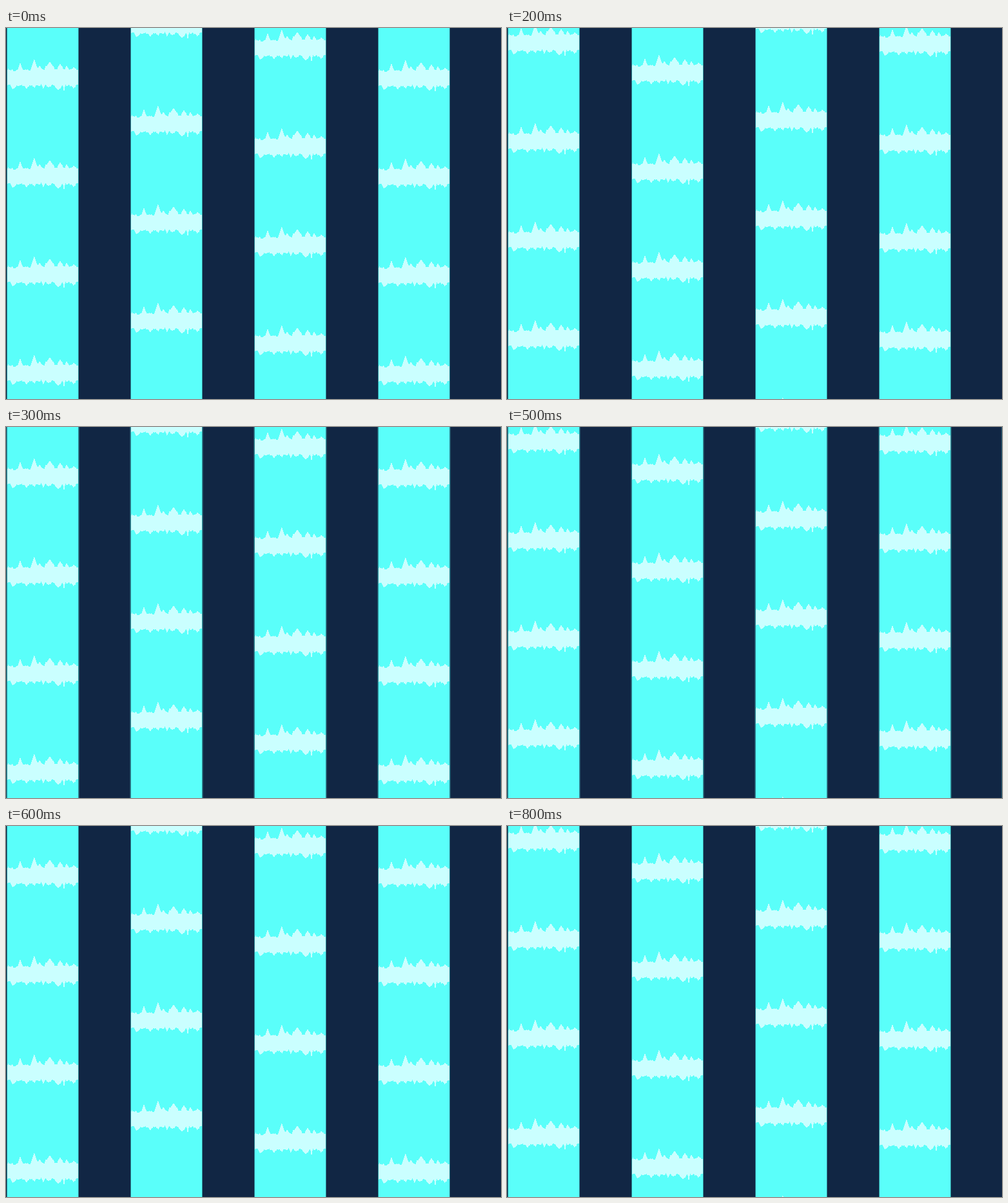
These frames come from a looping animation (768x576 px, 900 ms). An HTML page:

```html
<!DOCTYPE html>
<html lang="en">
<head>
<meta charset="utf-8">
<title>Flowing columns</title>
<style>
html, body { margin: 0; width: 100%; height: 100%; overflow: hidden; background: #112644; }
svg { display: block; width: 100vw; height: 100vh; }
</style>
</head>
<body>
<svg id="stage" viewBox="0 0 768 576" shape-rendering="crispEdges">
  <rect width="768" height="576" fill="#112644"/>
</svg>
<script>
const NS = 'http://www.w3.org/2000/svg';
const stage = document.getElementById('stage');
const STEP = 100, LOOP = 900, GAP = 153, WIDTH = 110, PITCH = 192;

// Main spikes of the wave: x, height, half width
const crests = [[20, 13, 4], [42, 18, 6], [50, 8, 4], [66, 14, 9], [82, 11, 5], [92, 8, 4], [104, 4, 6]];
const dips = [[10, 7, 6], [30, 6, 5], [42, 5, 3], [56, 7, 2], [65, 4, 5], [79, 9, 7], [88, 12, 2], [102, 5, 5]];

// Wave offset of each column at the first and last of three poses
const columns = [[48, 147], [-33, 41], [2, 114], [49, 149]];

function add(parent, tag, attrs) {
  const el = document.createElementNS(NS, tag);
  for (const key in attrs) el.setAttribute(key, attrs[key]);
  return parent.appendChild(el);
}

function seeded(seed) {
  return () => (seed = (seed * 16807) % 2147483647) / 2147483647;
}

const random = seeded(29);

function edge(level, spikes, dir) {
  const list = [];
  for (let x = 0; x <= WIDTH; x++) {
    const rise = Math.max(0, ...spikes.map(([at, h, w]) => h * (1 - Math.abs(x - at) / w)));
    const jitter = rise < 5 ? random() * 4 - 1 : 0;
    list.push(`${x},${(level + dir * (rise + jitter)).toFixed(1)}`);
  }
  return list;
}

const outline = [...edge(18, crests, -1), ...edge(40, dips, 1).reverse()].join(' ');
const glow = add(stage, 'g', { fill: '#24566c' });
add(glow, 'rect', { x: 767, width: 1, height: 576 });

const flows = columns.map((ends, i) => {
  const x = 2 + i * PITCH;
  add(glow, 'rect', { x: x - 2, width: WIDTH + 4, height: 576 });
  add(stage, 'rect', { x: x - 1, width: WIDTH + 2, height: 576, fill: '#2c8792' });
  add(stage, 'rect', { x, width: WIDTH, height: 576, fill: '#5afffa' });
  const g = add(stage, 'g', { fill: '#caffff' });
  for (let n = -1; n < 5; n++) {
    add(g, 'polygon', { points: outline, transform: `translate(0 ${n * GAP})` });
  }
  return { g, x, ends };
});

function draw(ms) {
  const t = ms % LOOP;
  const pose = Math.floor(t / STEP) % 3;
  for (const { g, x, ends: [from, to] } of flows) {
    const y = Math.round(from + (to - from) * pose / 2) % GAP;
    g.setAttribute('transform', `translate(${x} ${y})`);
  }
  glow.setAttribute('visibility', t >= 300 && t < 600 ? 'visible' : 'hidden');
}

function tick() {
  draw(performance.now());
  requestAnimationFrame(tick);
}
tick();
</script>
</body>
</html>
```
